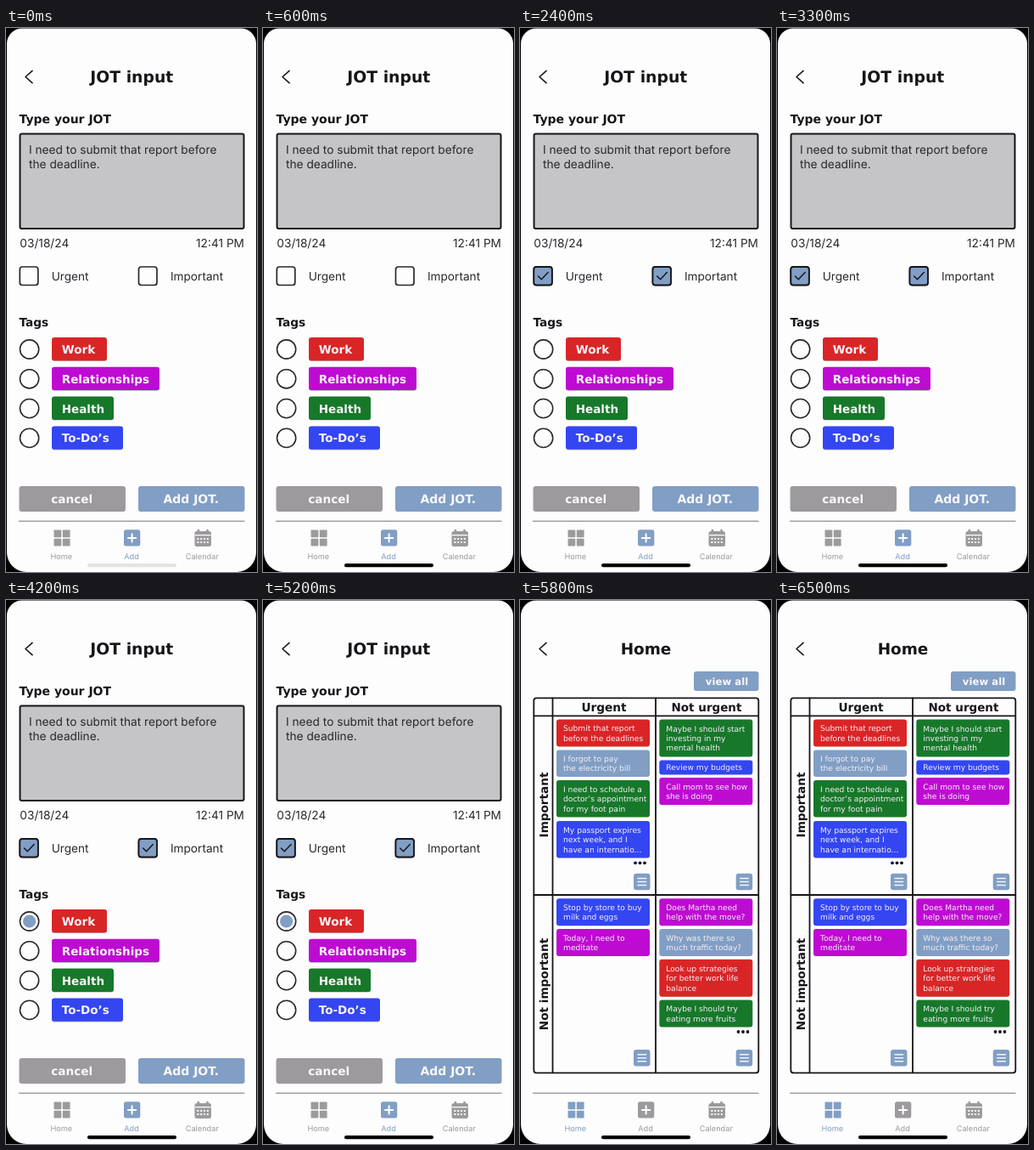
These frames come from a looping animation (296x640 px, 6.6 s). An HTML page:

```html
<!DOCTYPE html>
<html lang="en">
<head>
<meta charset="utf-8">
<title>JOT input</title>
<style>
  html, body { margin: 0; width: 100%; height: 100%; overflow: hidden; background: #000; }
  svg { display: block; width: 296px; height: 640px; text-rendering: geometricPrecision; }
  .bold { font-family: "DejaVu Sans", Verdana, sans-serif; font-weight: 700; }
  .card { font-family: "DejaVu Sans", Verdana, sans-serif; }
  .plain { font-family: Inter, "Liberation Sans", sans-serif; }
</style>
</head>
<body>
<svg id="stage" viewBox="0 0 296 640" xmlns="http://www.w3.org/2000/svg"></svg>
<script>
const LOOP = 6600;
const URGENT_AT = 1000, IMPORTANT_AT = 2100, WORK_AT = 4000, HOME_AT = 5300;
const INK = '#17151a', SOFT_INK = '#29272c', SLATE = '#819ec4', GRAY = '#9c9a9d';
const RED = '#d92526', PURPLE = '#be0bd2', GREEN = '#17782a', BLUE = '#3346f2';

const rect = (x, y, w, h, fill, r = 3, extra = '') =>
  `<rect x="${x}" y="${y}" width="${w}" height="${h}" rx="${r}" fill="${fill}" ${extra}/>`;
const text = (x, y, str, size, cls = 'bold', fill = INK, extra = '') =>
  `<text x="${x}" y="${y}" class="${cls}" font-size="${size}" fill="${fill}" ${extra}>${str}</text>`;
const line = (d, width = 2, color = INK) =>
  `<path d="${d}" fill="none" stroke="${color}" stroke-width="${width}" stroke-linecap="round" stroke-linejoin="round"/>`;
const group = (id, body) => `<g id="${id}">${body}</g>`;
const border = (width, color = INK) => `stroke="${color}" stroke-width="${width}"`;
const MIDDLE = 'text-anchor="middle"', END = 'text-anchor="end"';

// Input screen
function checkbox(x, id, label) {
  return rect(x, 281, 21.5, 21.5, 'none', 3, border(1.7, SOFT_INK)) +
    group(id, rect(x, 281, 21.5, 21.5, SLATE, 3, border(1.8)) +
      line(`M${x + 5.2} 292l3.8 3.8 7.8-8.2`, 1.5)) +
    text(x + 37.4, 297, label, 13.65, 'plain', SOFT_INK);
}

function tag(i, label, width, color) {
  const y = 364 + i * 34.8;
  return `<circle cx="27.6" cy="${y + 14}" r="11.1" fill="none" ${border(1.6, SOFT_INK)}/>` +
    rect(54, y + 0.7, width, 27.3, '#00000055') +
    rect(54, y, width, 27.3, color) +
    text(65.8, y + 19, label, 13.5, 'bold', '#f8f4f8');
}

function button(x, label, color, size) {
  return rect(x, 539, 125.5, 30, color) +
    text(x + 62.2, 559, label, size, 'bold', '#f8f8fa', MIDDLE);
}

function inputScreen() {
  return text(148.3, 64, 'JOT input', 18.8, 'bold', INK, MIDDLE) +
    text(15.5, 112, 'Type your JOT', 14) +
    rect(16.5, 124.5, 264, 111.5, '#c5c4c6', 2, border(2)) +
    text(27, 148, 'I need to submit that report before', 13.7, 'plain', SOFT_INK) +
    text(27, 164.5, 'the deadline.', 13.7, 'plain', SOFT_INK) +
    text(16.3, 258, '03/18/24', 13.7, 'plain', SOFT_INK) +
    text(281, 258, '12:41 PM', 13.7, 'plain', SOFT_INK, END) +
    checkbox(16.3, 'urgent', 'Urgent') +
    checkbox(156.5, 'important', 'Important') +
    text(15.5, 350.5, 'Tags', 13.7) +
    tag(0, 'Work', 65, RED) +
    tag(1, 'Relationships', 127, PURPLE) +
    tag(2, 'Health', 73, GREEN) +
    tag(3, 'To-Do’s', 84, BLUE) +
    `<circle id="work" cx="27.6" cy="378" r="7.6" fill="${SLATE}"/>` +
    button(15.5, 'cancel', GRAY, 13.6) + button(156, 'Add JOT.', SLATE, 14);
}

// Home screen
function card(x, y, height, color, ...lines) {
  const first = y + height / 2 + 3.4 - (lines.length - 1) * 5.7;
  return rect(x, y, 110, height, color) +
    lines.map((s, i) => text(x + 8, first + i * 11.4, s, 9.15, 'card', '#f3eff6')).join('');
}

function listIcon(x, y) {
  return rect(x, y, 19.5, 19.5, SLATE) +
    [5.7, 9.7, 13.7].map(dy => line(`M${x + 5} ${y + dy}h9.6`, 1.5, '#f4f7fb')).join('');
}

const dots = (x, y) => [0, 5.5, 11].map(dx =>
  `<circle cx="${x + dx}" cy="${y}" r="1.9" fill="${INK}"/>`).join('');

const sideLabel = (y, label) =>
  text(0, 0, label, 13.6, 'bold', INK, `${MIDDLE} transform="translate(33 ${y}) rotate(-90)"`);

function homeScreen() {
  const L = 43, R = 164.3;
  return text(148.5, 64, 'Home', 18.4, 'bold', INK, MIDDLE) +
    rect(205, 84, 76.5, 23, SLATE) +
    text(244, 100, 'view all', 11.7, 'bold', '#f8f8fa', MIDDLE) +
    rect(16.3, 115.3, 265, 441, 'none', 3, border(1.8)) +
    line('M38.5 115.5V556M160 115.5V556M16.5 136.3H281M16.5 347H281', 1.8) +
    text(99, 130.7, 'Urgent', 13.7, 'bold', INK, MIDDLE) +
    text(220, 130.7, 'Not urgent', 13.5, 'bold', INK, MIDDLE) +
    sideLabel(241, 'Important') + sideLabel(452, 'Not important') +
    card(L, 140.5, 32, RED, 'Submit that report', 'before the deadlines') +
    card(L, 176.5, 31.5, SLATE, 'I forgot to pay', 'the electricity bill') +
    card(L, 212, 43.5, GREEN, 'I need to schedule a', 'doctor’s appointment', 'for my foot pain') +
    card(L, 260, 43.5, BLUE, 'My passport expires', 'next week, and I', 'have an internatio...') +
    dots(136, 309.3) + listIcon(134, 321.7) +
    card(R, 140.5, 44, GREEN, 'Maybe I should start', 'investing in my', 'mental health') +
    card(R, 188.5, 17, BLUE, 'Review my budgets') +
    card(R, 209, 32, PURPLE, 'Call mom to see how', 'she is doing') +
    listIcon(254.7, 321.7) +
    card(L, 351.3, 32, BLUE, 'Stop by store to buy', 'milk and eggs') +
    card(L, 387, 32, PURPLE, 'Today, I need to', 'meditate') +
    listIcon(134, 529) +
    card(R, 351.3, 32, PURPLE, 'Does Martha need', 'help with the move?') +
    card(R, 387, 32, SLATE, 'Why was there so', 'much traffic today?') +
    card(R, 422.7, 44, RED, 'Look up strategies', 'for better work life', 'balance') +
    card(R, 470.5, 32, GREEN, 'Maybe I should try', 'eating more fruits') +
    dots(257.5, 508) + listIcon(254.7, 529);
}

// Shared frame and navigation
function calendarIcon() {
  let s = rect(222.5, 592, 19.5, 18, GRAY, 2.5) +
    rect(225.6, 589.8, 2.6, 5, GRAY, 1) + rect(236.2, 589.8, 2.6, 5, GRAY, 1) +
    line('M223.5 596.7H241', 1.2, '#fff');
  for (let i = 0; i < 8; i++)
    s += rect(225.4 + (i % 4) * 3.8, 600 + Math.floor(i / 4) * 4, 2, 2, '#fff', 0.5);
  return s;
}

function navigation() {
  const squares = [[56.5, 590.5], [66.8, 590.5], [56.5, 600.8], [66.8, 600.8]];
  const label = (x, s) => `<text x="${x}" y="625.3" class="plain" font-size="9.2" ${MIDDLE}>${s}</text>`;
  return line('M15.5 580.3H281', 1.4, '#a09fa3') +
    group('homeTab', squares.map(([x, y]) =>
      `<rect x="${x}" y="${y}" width="8.8" height="8.8" rx=".8"/>`).join('') + label(65.3, 'Home')) +
    group('addTab', '<rect x="139" y="590.2" width="19.3" height="19.3" rx="2.5"/>' +
      line('M148.6 595.2v9.4M143.9 599.9h9.4', 2, '#fff') + label(148, 'Add')) +
    calendarIcon() + `<g fill="${GRAY}">${label(231.3, 'Calendar')}</g>` +
    rect(96, 630, 105, 4.3, '#000', 2.1, 'id="indicator"');
}

document.getElementById('stage').innerHTML =
  rect(0, 0, 296, 640, '#000', 0) +
  '<path d="M19 .5H277A18 18 0 0 1 295 18.5V617A23 23 0 0 1 272 640H24A23 23 0 0 1 1 617V18.5A18 18 0 0 1 19 .5Z" fill="#fefdfe"/>' +
  line('M31 50.3L23 57.5 31 64.7', 1.6) +
  group('input', inputScreen()) + group('home', homeScreen()) + navigation();

const el = id => document.getElementById(id);
const show = (id, on) => { el(id).style.display = on ? '' : 'none'; };

function render(t) {
  const home = t >= HOME_AT;
  show('input', !home);
  show('home', home);
  show('urgent', t >= URGENT_AT);
  show('important', t >= IMPORTANT_AT);
  show('work', t >= WORK_AT);
  el('homeTab').setAttribute('fill', home ? SLATE : GRAY);
  el('addTab').setAttribute('fill', home ? GRAY : SLATE);
  const fade = Math.min(1, Math.floor(t / 100) / 5);
  el('indicator').setAttribute('fill-opacity', 0.1 + 0.9 * fade);
}

const start = performance.now();
function tick() {
  render((performance.now() - start) % LOOP);
  requestAnimationFrame(tick);
}
tick();
</script>
</body>
</html>
```
